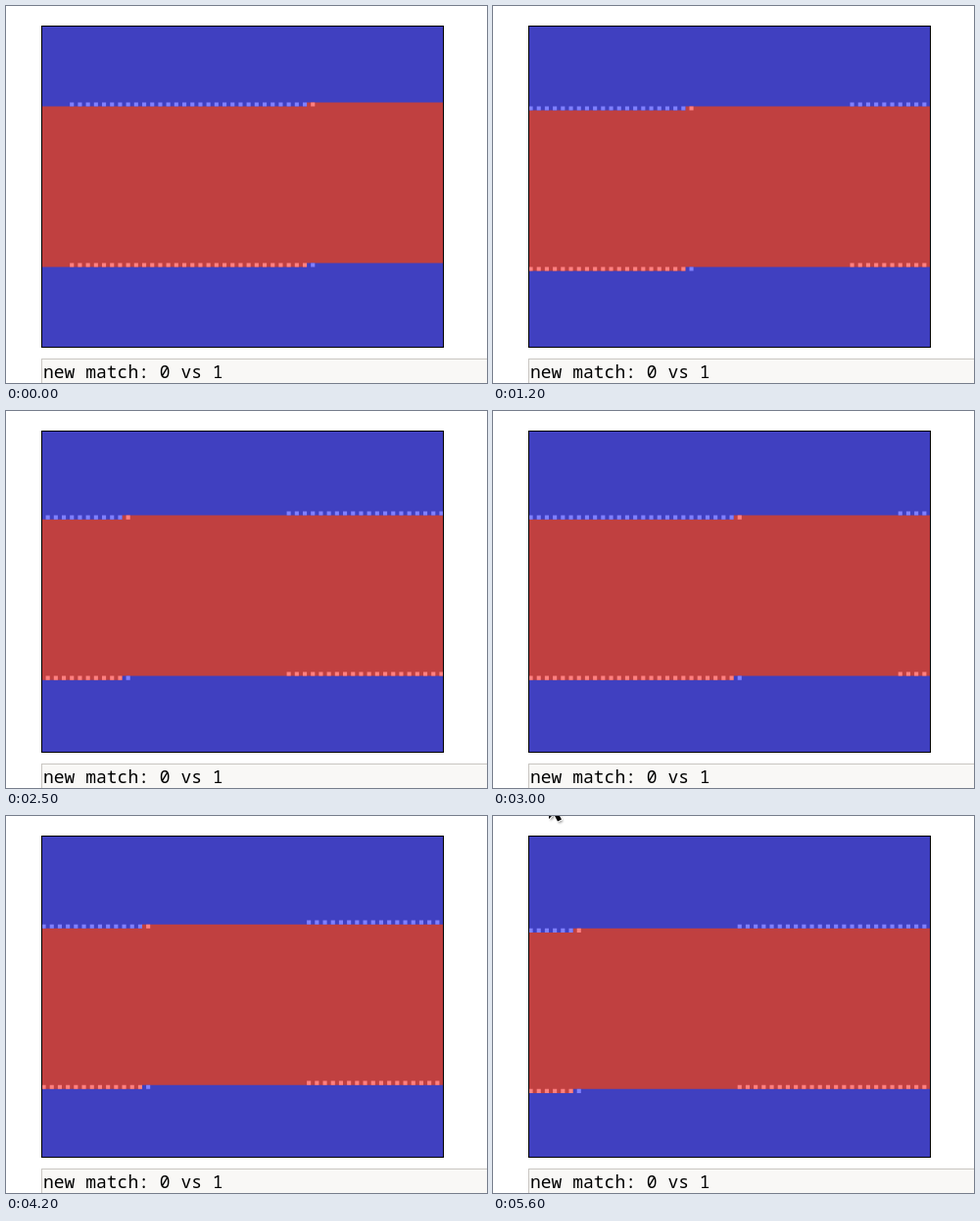
Animation, 491 px wide and 385 px high, one loop 5700 ms. Source, as an HTML page:

```html
<!DOCTYPE html>
<html lang="en">
<head>
<meta charset="utf-8">
<title>Memory match</title>
<style>
  html, body { margin: 0; width: 100%; height: 100%; overflow: hidden; background: #fff; }
  svg { display: block; }
  text { font: 18px "Noto Sans Mono", "DejaVu Sans Mono", monospace; white-space: pre; }
</style>
</head>
<body>
<svg width="491" height="385" viewBox="0 0 491 385">
  <defs>
    <filter id="soft" x="-50%" y="-50%" width="200%" height="200%">
      <feGaussianBlur stdDeviation="1.3"/>
    </filter>
    <path id="arrow" d="M57-20V3L62-2L66 5.5L70 3.5L66-3.5H73Z"/>
  </defs>
  <rect width="491" height="385" fill="#fff"/>
  <rect x="36.5" y="20.5" width="410" height="328" fill="#4040c0"/>
  <path id="red" fill="#c04040"/>
  <path id="blueDots" fill="#8080ff"/>
  <path id="redDots" fill="#ff8080"/>
  <rect x="36.5" y="20.5" width="410" height="328" fill="none" stroke="#000"/>
  <rect x="36.5" y="360.5" width="480" height="40" fill="#f9f8f6" stroke="#c9c6c2"/>
  <text x="38" y="380">new match: 0 vs 1</text>
  <g id="cursor">
    <use href="#arrow" x="1.5" y="2" fill="#000" opacity=".4" filter="url(#soft)"/>
    <use href="#arrow" fill="#000" stroke="#fff" stroke-width="2" paint-order="stroke"/>
  </g>
</svg>
<script>
const LOOP = 5700, STEP = 100;
const COLS = 100, HALF = 4000, CELL = 4.1, LEFT = 36.5, TOP = 20.5;
const TRAIL = 30, START = 1967;

const el = id => document.getElementById(id);
const red = el("red"), blueDots = el("blueDots"), redDots = el("redDots"), cursor = el("cursor");

const px = col => (LEFT + col * CELL).toFixed(2);
const py = row => (TOP + row * CELL).toFixed(2);
const place = i => [i % COLS, Math.floor(i / COLS)];

function dot(i) {
  const [col, row] = place(i);
  return `M${px(col)} ${py(row)}h${CELL}v${CELL}h-${CELL}z`;
}

// Six cells per step, with an extra cell slipped in now and then.
function headAt(n) {
  return START + 6 * n + Math.max(0, Math.floor((n - 8.4) / 5.375) + 1);
}

// Outline of all cells from index a up to a + HALF, in reading order.
function territory(a) {
  const [col, row] = place(a);
  const end = row + HALF / COLS;
  return `M${px(col)} ${py(row)}H${px(COLS)}V${py(end)}H${px(col)}` +
    `V${py(end + 1)}H${px(0)}V${py(row + 1)}H${px(col)}Z`;
}

function trail(head) {
  let d = "";
  for (let k = 1; k <= TRAIL; k++) d += dot(head - 2 * k);
  return d;
}

function moveCursor(n) {
  const p = Math.min(1, Math.max(0, (n - 48) / 4));
  const rest = (1 - p) * (1 - p);
  cursor.setAttribute("visibility", n < 48 ? "hidden" : "visible");
  cursor.setAttribute("transform", `translate(${23 * rest} ${-8.5 * rest})`);
}

function draw(ms) {
  const n = Math.floor((ms % LOOP) / STEP);
  const head = headAt(n), far = head + HALF;
  red.setAttribute("d", territory(head - 1));
  blueDots.setAttribute("d", trail(head) + dot(far));
  redDots.setAttribute("d", trail(far) + dot(head));
  moveCursor(n);
}

let begin = null;
function tick(now) {
  if (begin === null) begin = now;
  draw(Math.max(0, now - begin));
  requestAnimationFrame(tick);
}
draw(0);
requestAnimationFrame(tick);
</script>
</body>
</html>
```
